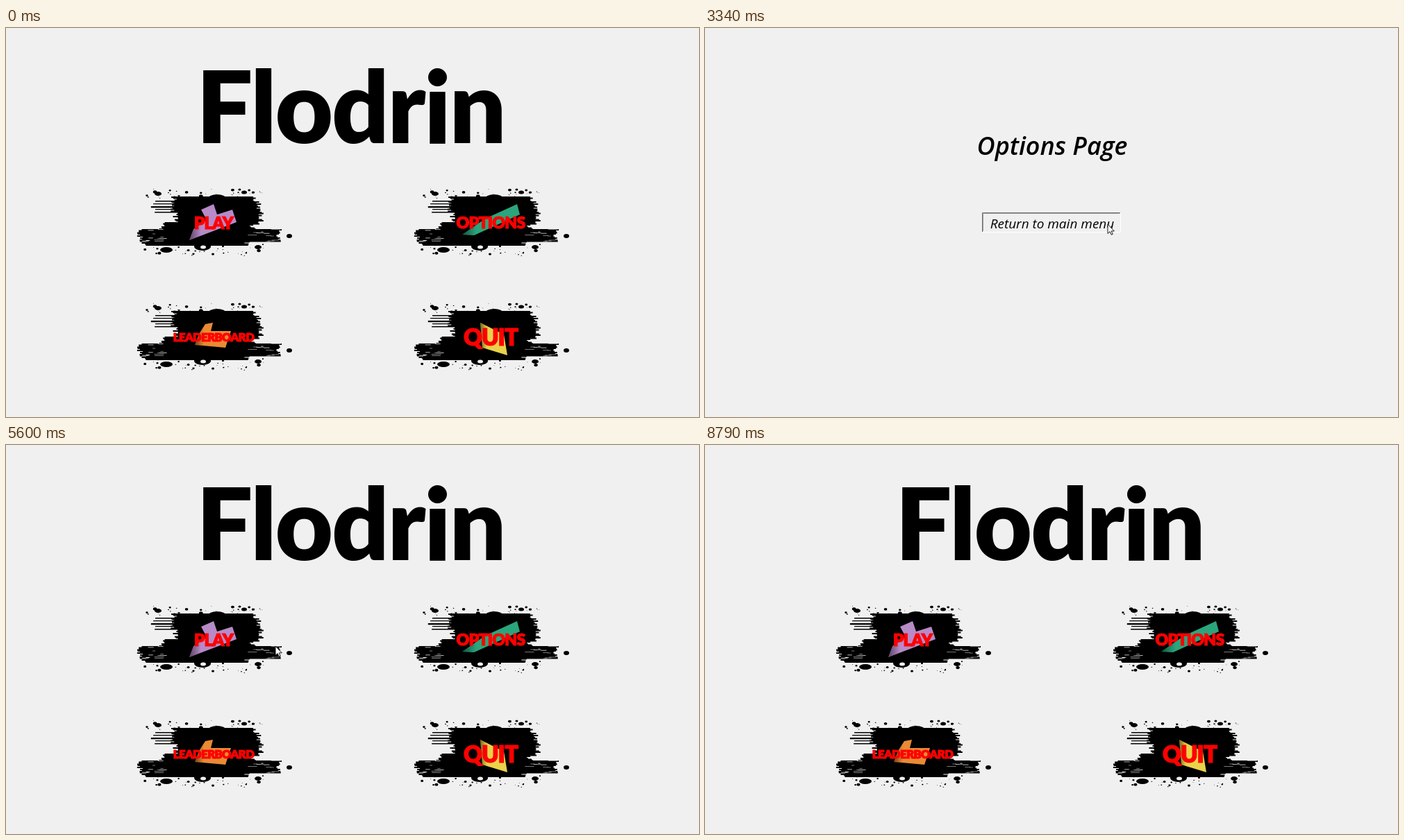
An HTML page that plays this animation: 998x561 px, repeating every 9380 ms.

```html
<!DOCTYPE html>
<html lang="en">
<head>
<meta charset="utf-8">
<title>Game menu</title>
<style>
  html, body { margin: 0; height: 100%; overflow: hidden; background: #f0f0f0; }
  svg { display: block; width: 998px; height: 561px; }
  .logo { font: 900 144px Lato, sans-serif; letter-spacing: -2.2px; }
  .label { font-family: Lato, sans-serif; font-weight: 900; letter-spacing: -.03em; text-anchor: middle;
    fill: #f00; stroke: #f00; stroke-width: 1.2px; }
  .block { filter: blur(.6px); }
  .heading, .caption { font-family: "Open Sans", "Noto Sans", sans-serif; font-style: italic; text-anchor: middle; }
  .heading { font-size: 36px; font-weight: 600; }
  .caption { font-size: 19px; }
  .edge { fill: none; stroke-width: 1; }
</style>
</head>
<body>
<svg viewBox="0 0 998 561">
  <defs>
    <linearGradient id="shade">
      <stop offset="0" stop-opacity=".5"/>
      <stop offset=".25" stop-opacity="0"/>
    </linearGradient>
    <g id="splat"><path id="ink"/><path id="gaps" fill="#f0f0f0"/></g>
  </defs>
  <g id="menu">
    <text class="logo" x="274" y="166">Flodrin</text>
  </g>
  <g id="page">
    <text id="heading" class="heading" x="500" y="183"></text>
    <path id="topLeft" class="edge" d="M399.5 294V266.5H598"/>
    <path id="bottomRight" class="edge" d="M399 294.5H598.5V266"/>
    <path id="inner" class="edge" stroke="#a0a0a0"/>
    <text id="caption" class="caption" x="499" y="287.5">Return to main menu</text>
  </g>
  <path id="cursor" d="M0 0V13.4L3.1 10.6 5.2 15.2 7.2 14.3 5.2 9.9H9.3Z" fill="#fff" stroke="#000" stroke-width=".9"/>
</svg>
<script>
const LOOP = 9380;
const $ = id => document.getElementById(id);

let seed = 11;
const random = (min, max) => {
  seed = (seed * 16807) % 2147483647;
  return min + (max - min) * seed / 2147483647;
};

const bar = (x, y, w, h) => `M${x} ${y}h${w}v${h}h${-w}z`;
const blob = (x, y, rx, ry) =>
  `M${x - rx} ${y}a${rx} ${ry} 0 1 1 ${2 * rx} 0a${rx} ${ry} 0 1 1 ${-2 * rx} 0z`;

// A block of paint with frayed left and right ends.
function band(x, y, w, h) {
  let path = "";
  for (let dy = 0; dy < h; dy += 1.5) {
    const left = random(0, 9);
    path += bar(x + left, y + dy, w - left - random(0, 9), 1.9);
  }
  return path;
}

function drawSplat() {
  let gaps = blob(284, 316, 4, 2.5);
  let ink = band(238, 243, 122, 8) + band(237, 250, 131, 14) + band(239, 262, 132, 20) +
    band(220, 280, 140, 10) + band(188, 290, 210, 18) + band(194, 306, 158, 7) +
    blob(304, 246, 13, 6) + blob(283, 315, 12, 6) + blob(231, 320, 9, 4) + blob(219, 239, 5, 3) +
    blob(343, 237, 4, 2.5) + blob(363, 316, 5, 3) + blob(408, 300, 4, 3);
  for (let y = 249; y < 268; y += 4) ink += bar(random(208, 216), y, 34, random(.8, 2.5));
  for (let i = 0; i < 90; i++) {
    const size = .4 + 1.8 * random(0, 1) ** 3;
    const y = i % 2 ? random(232, 246) : random(312, 329);
    ink += blob(random(200, 372), y, size * 1.3, size);
  }
  for (let i = 0; i < 24; i++) {
    gaps += bar(i % 2 ? random(194, 225) : random(345, 385), random(289, 308), random(3, 14), random(.4, .9));
  }
  $("ink").setAttribute("d", ink);
  $("gaps").setAttribute("d", gaps);
}

const buttons = [
  { text: "PLAY", size: 24, color: "#b78ac8", block: "281,262 299,254 304,269 326,262 332,280 264,306 270,290 289,277" },
  { text: "OPTIONS", size: 23, color: "#2ba57c", block: "736,254 740,269 674,299 657,298 690,275" },
  { text: "LEADERBOARD", size: 16.5, color: "#e98a35", block: "287,427 298,425 295,437 324,437 316,461 272,457 278,441" },
  { text: "QUIT", size: 33, color: "#ead24a", block: "683,425 717,442 722,472 686,461" }
];

function drawButton({ text, size, color, block }, i) {
  const dx = i % 2 * 399, dy = i > 1 ? 165 : 0;
  return `<use href="#splat" x="${dx}" y="${dy}"/>
    <g class="block"><polygon points="${block}" fill="${color}"/><polygon points="${block}" fill="url(#shade)"/></g>
    <text class="label" x="${299 + dx}" y="${281 + dy + size * .36}" font-size="${size}">${text}</text>`;
}

// Each move eases to a point, optionally swinging out on the way.
const moves = [
  { from: 465, to: 1200, x: 717, y: 279 },
  { from: 1870, to: 2790, x: 606, y: 318, swingX: 165, swingY: 130 },
  { from: 2860, to: 3130, x: 580, y: 283 },
  { from: 3740, to: 4060, x: 348, y: 440 },
  { from: 4260, to: 4640, x: 556, y: 314 },
  { from: 4710, to: 4930, x: 569, y: 278 },
  { from: 5440, to: 5740, x: 339, y: 293 },
  { from: 5940, to: 6850, x: 339, y: 293, swingX: -85, swingY: -25 },
  { from: 7330, to: 8230, x: 339, y: 293, swingX: -75, swingY: 10 },
  { from: 8300, to: 8790, x: 850, y: 565 }
];

function cursorAt(t) {
  let x = 850, y = 565;
  for (const move of moves) {
    if (t < move.from) break;
    const f = Math.min(1, (t - move.from) / (move.to - move.from));
    const eased = f * (2 - f), swing = Math.sin(Math.PI * f);
    x += (move.x - x) * eased + (move.swingX || 0) * swing;
    y += (move.y - y) * eased + (move.swingY || 0) * swing;
  }
  return [Math.round(x), Math.round(y)];
}

const within = (t, from, to) => t >= from && t < to;

function render(t) {
  const options = within(t, 1270, 3405), leaderboard = within(t, 4200, 5400);
  const pressed = within(t, 3265, 3405) || within(t, 5190, 5400);
  const onPage = options || leaderboard;
  $("menu").style.display = onPage ? "none" : "";
  $("page").style.display = onPage ? "" : "none";
  $("heading").textContent = leaderboard ? "Leaderboard Page" : "Options Page";
  $("topLeft").setAttribute("stroke", pressed ? "#696969" : "#fff");
  $("bottomRight").setAttribute("stroke", pressed ? "#fff" : "#696969");
  $("inner").setAttribute("d", pressed ? "M400.5 293V267.5H597" : "M400 293.5H597.5V267");
  $("caption").setAttribute("transform", pressed ? "translate(1 1)" : "");
  $("cursor").setAttribute("transform", `translate(${cursorAt(t)})`);
}

drawSplat();
$("menu").insertAdjacentHTML("beforeend", buttons.map(drawButton).join(""));

const begin = performance.now();
function tick() {
  render((performance.now() - begin) % LOOP);
  requestAnimationFrame(tick);
}
tick();
</script>
</body>
</html>
```
